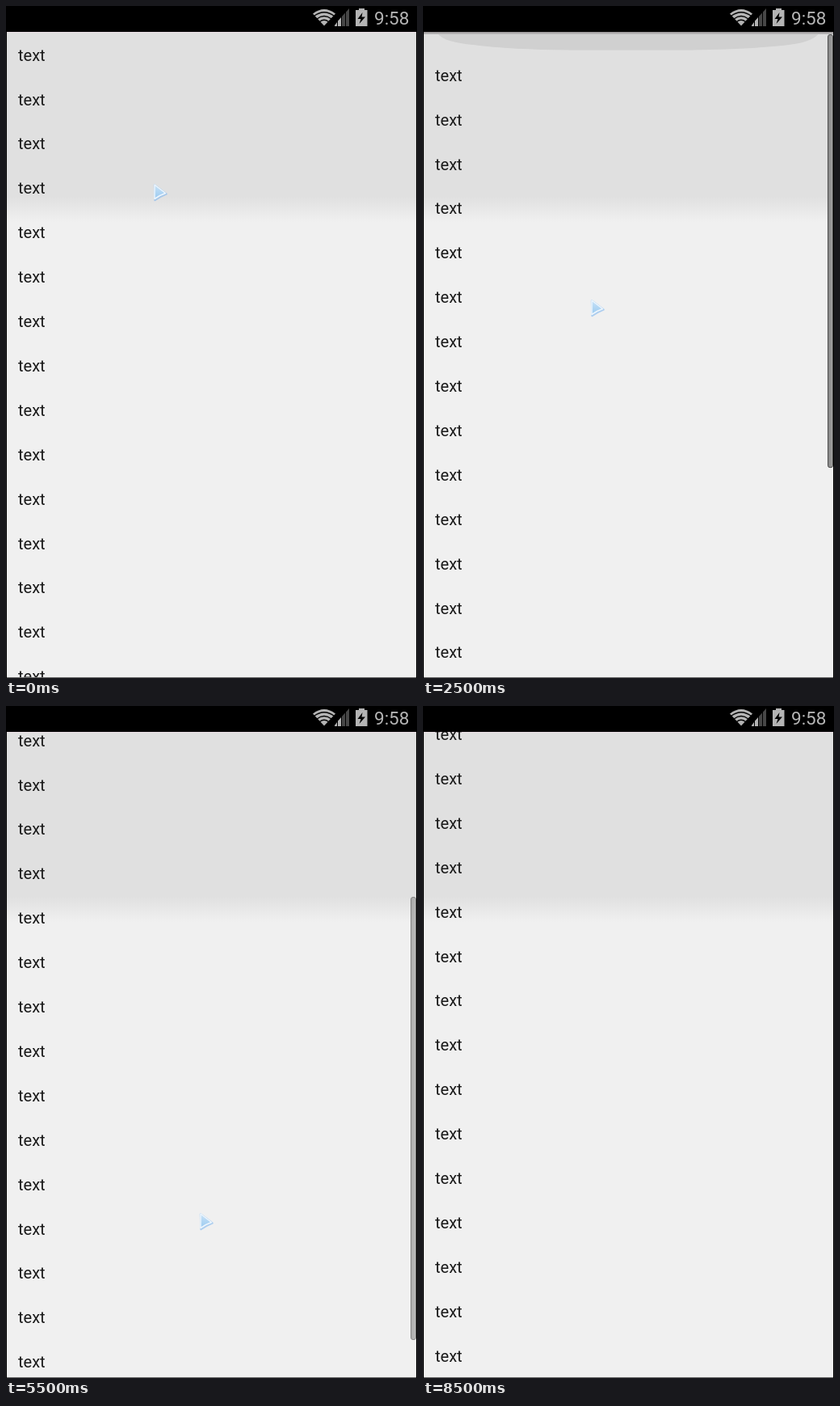
Write an HTML page that moves like this. It is 509 px wide and 831 px high and loops after 9500 ms.

```html
<!DOCTYPE html>
<html lang="en">
<head>
<meta charset="utf-8">
<title>Overscroll list</title>
<style>
  html, body { margin: 0; width: 100%; height: 100%; overflow: hidden; background: #000; }
  svg { display: block; width: 509px; height: 831px; }
  text { font-family: Roboto, sans-serif; }
  #list text { font-size: 20px; fill: #1a1a1a; }
</style>
</head>
<body>
<svg viewBox="0 0 509 831">
  <defs>
    <linearGradient id="page" gradientUnits="userSpaceOnUse" x1="0" y1="236" x2="0" y2="268">
      <stop offset="0" stop-color="#e0e0e0"/>
      <stop offset="1" stop-color="#f0f0f0"/>
    </linearGradient>
    <linearGradient id="thumb">
      <stop offset="0" stop-color="#828282"/>
      <stop offset="1" stop-color="#a6a6a6"/>
    </linearGradient>
    <linearGradient id="rim" x2="0" y2="1">
      <stop offset="0" stop-color="#979294"/>
      <stop offset="1" stop-color="#c2c2c2"/>
    </linearGradient>
    <linearGradient id="ice" x2="0" y2="1">
      <stop offset="0" stop-color="#c9e3f7"/>
      <stop offset="1" stop-color="#9bcaf0"/>
    </linearGradient>
    <g id="full">
      <path d="M18 34C24 42 40 46 62 48Q110 54 180 54.5H335Q420 53 460 47Q484 43 490 34Z" fill="#d0d0d0"/>
      <rect x="1" y="32" width="507" height="3" fill="url(#rim)"/>
    </g>
    <rect id="thin" x="62" y="32" width="366" height="1.6" fill="#aaa5a7"/>
    <clipPath id="view"><rect x="1" y="32" width="507" height="798"/></clipPath>
  </defs>

  <rect x="1" y="32" width="507" height="798" fill="url(#page)"/>
  <rect x="1" y="32" width="507" height="1" fill="#e8dce3"/>
  <rect x="1" y="830" width="507" height="1" fill="#666"/>
  <g clip-path="url(#view)">
    <g id="list"></g>
    <use id="glow"/>
    <rect id="bar" x="501.5" width="6" height="547" rx="2.5" fill="url(#thumb)" stroke="#505050"/>
  </g>

  <g fill="#b4b4b4">
    <path d="M394 24.5L380 9.5Q394 -1.5 408 9.5Z"/>
    <g fill="none" stroke="#000" stroke-width="1.3">
      <path d="M381.5 12.5Q394 3 406.5 12.5"/>
      <path d="M385 16Q394 9 403 16"/>
      <path d="M388.5 19.5Q394 15 399.5 19.5"/>
    </g>
    <path d="M407 25V24L410 20V25ZM411 25V18.5L415 14V25Z"/>
    <path d="M416 25V13L420 8.5V25ZM421 25V7.5L425 3V25Z" fill="#474747"/>
    <path d="M437 3H444V5H447.5V25H433V5H437Z"/>
    <path d="M441.5 8L435.5 16H439.5L437.5 22L445 13.5H440.5Z" fill="#000"/>
    <text x="456" y="23" font-size="22.5">9:58</text>
  </g>

  <g id="cursor" stroke-linejoin="round">
    <path d="M1 1.5L15.5 12.5L8 16L1.5 20Z" fill="#7fb6ee" stroke="#7fb6ee" stroke-width="2.4" opacity=".6"/>
    <path d="M1 1L14.5 11.5L7.5 14.5L1 18.5Z" fill="url(#ice)" stroke="#eef6fd" stroke-width="1.5"/>
  </g>
</svg>
<script>
const $ = id => document.getElementById(id);
const STEP = 0.5, LOOP = 9.5;
const ROWS = 21, ROW = 54.9, VIEW = 798;
const END = ROWS * ROW - VIEW;
const PULL = 0.16; // list travel per pixel of hand travel past an edge

// turning points of the hand: seconds, x, y
const turns = [
  [0, 183, 220], [0.5, 190, 192], [1.5, 199, 416], [2, 202, 250],
  [3.5, 217, 528], [4.5, 216, 517], [5, 222, 354], [5.5, 240, 627],
  [6, 244, 410], [6.5, 248, 635], [7, 247, 298], [7.5, 246, 283]
];

const clamp = (v, lo, hi) => Math.min(hi, Math.max(lo, v));
const ease = p => Math.sin(Math.PI / 2 * p ** 1.2);
const coasting = t => t >= 5.5 && t < 6;

function handAt(t) {
  const next = clamp(turns.findIndex(turn => turn[0] > t), 0, turns.length);
  if (!next) return turns[t < 0 ? 0 : turns.length - 1].slice(1);
  const [t0, x0, y0] = turns[next - 1], [t1, x1, y1] = turns[next];
  const p = ease((t - t0) / (t1 - t0));
  return [x0 + (x1 - x0) * p, y0 + (y1 - y0) * p];
}

function scrollAt(t) {
  const y = handAt(t)[1];
  if (t < 1) return 0;
  if (t < 4) return PULL * (206 - y);
  if (coasting(t)) return 292.5;
  if (t < 6) return 536 - y;
  return t < 8 ? END + PULL * (644 - y) : END;
}

const overshoot = t => scrollAt(t) - clamp(scrollAt(t), 0, END);

const set = (id, attrs) => {
  for (const key in attrs) $(id).setAttribute(key, attrs[key]);
};

for (let i = 0; i < ROWS; i++) {
  const label = document.createElementNS("http://www.w3.org/2000/svg", "text");
  label.setAttribute("x", 15);
  label.setAttribute("y", 67.6 + i * ROW);
  label.textContent = "text";
  $("list").append(label);
}

function show(t) {
  const [x, y] = handAt(t);
  const scroll = scrollAt(t);
  const over = overshoot(t);
  const trace = over || overshoot(t - STEP); // the glow lingers for one step
  const done = t >= 8.5;

  set("list", { transform: `translate(0 ${-scroll})` });
  set("cursor", {
    transform: `translate(${Math.round(x)} ${Math.round(y)})`,
    visibility: done ? "hidden" : "visible"
  });
  set("bar", {
    y: Math.round(Math.max(35, 34 + clamp(scroll, 0, END) * VIEW / (ROWS * ROW))) + 0.5,
    height: 547 + Math.min(0, scroll) * 0.47,
    opacity: t < 1 || done ? 0 : coasting(t) ? 0.65 : 1
  });
  set("glow", {
    href: Math.abs(over) > 15 ? "#full" : "#thin",
    transform: trace > 0 ? "translate(0 862) scale(1 -1)" : "",
    visibility: trace ? "visible" : "hidden"
  });
}

let shown = -1;
function tick() {
  const step = Math.floor(performance.now() / 1000 % LOOP / STEP);
  if (step !== shown) show((shown = step) * STEP);
  requestAnimationFrame(tick);
}
tick();
</script>
</body>
</html>
```
